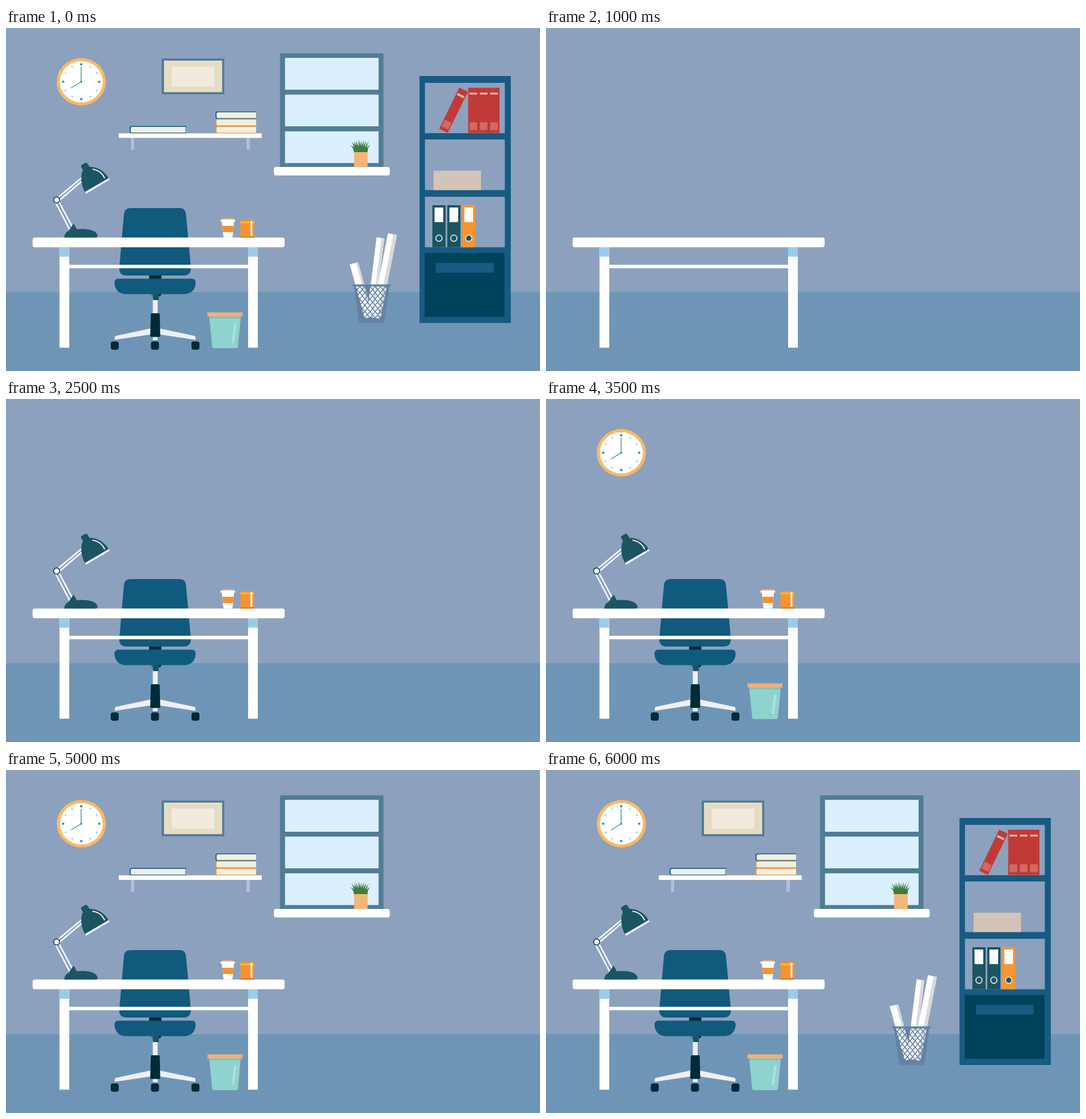
These frames come from a looping animation (933x600 px, 7 s). An HTML page:

```html
<!DOCTYPE html>
<html lang="en">
<head>
<meta charset="utf-8">
<title>Home office</title>
<style>
  html, body { margin: 0; width: 100%; height: 100%; overflow: hidden; background: #8ca1bd; }
  svg { display: block; width: 100%; height: 100%; }
</style>
</head>
<body>
<svg viewBox="0 0 933 600" xmlns="http://www.w3.org/2000/svg">
  <defs>
    <pattern id="mesh" x="609" y="452" width="9" height="11" patternUnits="userSpaceOnUse">
      <path d="M-1 -1.22L10 12.22M10 -1.22L-1 12.22" stroke="#6482a4" stroke-width="1.7"/>
    </pattern>
    <g id="binder">
      <path d="M0 0H23V73.5H0Z"/>
      <path d="M3.7 4H19V29.5H3.7Z" fill="#fff"/>
      <circle cx="11.5" cy="57.7" r="5.5" fill="#1a5560" stroke="#d3e6ea" stroke-width="1.8"/>
    </g>
    <g id="caster"><rect width="14" height="14.5" rx="4" fill="#002b37"/></g>
    <g id="volume">
      <path d="M71.5 0H4Q0 0 0 4V9Q0 13 4 13H71.5V11.5H4V1.5H71.5Z"/>
      <path d="M71 1.5H4.5Q1.8 1.5 1.8 4V9Q1.8 11.5 4.5 11.5H71Z" fill="#eff0e0"/>
    </g>
  </defs>

  <rect width="933" height="600" fill="#8ca1bd"/>
  <rect y="462" width="933" height="138" fill="#6f95b6"/>

  <!-- chair -->
  <g data-at="2500">
    <path d="M250 432H271.500V440H250Z" fill="#002b37"/>
    <path d="M218 315H303Q313.500 315 314.500 326L323 419Q323.500 433 310 433H211Q197 433 198 419L206 326Q207 315 218 315Z" fill="#105a7e"/>
    <path d="M251 464H257V469Q252 470 251 464Z" fill="#4d8587"/>
    <path d="M265 464H271V467Q270 470 265 469Z" fill="#002b37"/>
    <path d="M256.500 474H265V546H256.500Z" fill="#efeff3"/>
    <path d="M256 464H267V476H257Z" fill="#1a5561"/>
    <path d="M196 438.500H325Q331.500 438.500 331.300 446C331 456 325 465.500 311 465.500H209C196 465.500 190 456 189.500 446Q189.500 438.500 196 438.500Z" fill="#105a7e"/>
    <path d="M253 525.500L192 538.500Q190 539 190 541V545.500L253 536Z" fill="#efeff3"/>
    <path d="M268 525.500L329 538.500Q331 539 331 541V545.500L268 536Z" fill="#efeff3"/>
    <path d="M255 499H267Q268.500 499 268.600 501L269.500 538Q269.500 540.500 267 540.500H254.500Q252 540.500 252 538L253 501Q253 499 255 499Z" fill="#002b37"/>
    <use href="#caster" x="183" y="548.300"/>
    <use href="#caster" x="253.300" y="548.300"/>
    <use href="#caster" x="324" y="548.300"/>
  </g>

  <!-- desk -->
  <g data-at="1000" fill="#fff">
    <path d="M110 414.300H423V420.300H110ZM93.500 383H110.500V559.300H93.500ZM423 383H440V559.300H423Z"/>
    <path d="M93.500 383H110.500V400H93.500ZM423 383H440V400H423Z" fill="#9accea"/>
    <rect x="46.500" y="366.500" width="440.300" height="17" rx="4"/>
  </g>

  <!-- lamp -->
  <g data-at="1500">
    <path d="M86.500 305L111 352M92 303L117 350M89 298L134 260.500M92.500 302L136 265" fill="none" stroke="#fff" stroke-width="2.500"/>
    <path d="M102 366.500C102 360 105 357 110 354.500L117 343.500Q118.500 342 120 345L123.500 352C140 350 158 353 160 363Q160 366.500 157 366.500Z" fill="#1a5561"/>
    <circle cx="88.400" cy="300.800" r="5.300" fill="#fff" stroke="#1b4a66" stroke-width="1.800"/>
    <path d="M138.500 288C130 273 130 256 134.500 249L131.300 243Q130.500 240.500 133 239L138.500 236Q141 235.300 142.500 237.500L146 243C158 242.500 172 249 179.500 263.500Z" fill="#1a5561"/>
    <path d="M138 286.800L179.500 262.500L181.300 265.300L140 290Z" fill="#efeff3"/>
    <path d="M151 247C161 248.500 169 254.500 172.500 263" fill="none" stroke="#e9f0f2" stroke-width="2"/>
  </g>

  <!-- cup and notebook -->
  <g data-at="2000">
    <path d="M377 338H398.500L395.700 366.500H380Z" fill="#fff"/>
    <path d="M378 346H397.700L396.600 357H379.100Z" fill="#f5912d"/>
    <path d="M379 333H396.500Q398 333 398 336H377Q377 333 379 333Z" fill="#f3b27a"/>
    <rect x="374.700" y="335" width="25.500" height="3.700" rx="1" fill="#fff"/>
    <rect x="409.500" y="336" width="24" height="30.500" rx="1" fill="#f7922f"/>
    <path d="M409.500 338.500H433.500V341.800H409.500Z" fill="#fdb92b"/>
    <path d="M409.500 364.300H433.500V366.500H409.500Z" fill="#e27a28"/>
    <rect x="427.300" y="337.500" width="3" height="26" rx="1.200" fill="#fff"/>
  </g>

  <!-- bin -->
  <g data-at="3000">
    <path d="M355 504H410.300L405.300 557Q405 560 402 560H363.500Q360.500 560 360.200 557Z" fill="#8fd3cf"/>
    <path d="M355 504H410.300L409.900 508H355.400Z" fill="#82c3c2"/>
    <path d="M400.500 518.500L396.500 549.500" stroke="#b0e0de" stroke-width="4" stroke-linecap="round"/>
    <path d="M352 497.500H413.300V504.500H352Z" fill="#f8ad78"/>
  </g>

  <!-- clock -->
  <g data-at="3500">
    <ellipse cx="131.600" cy="94" rx="43" ry="41.500" fill="#fdb863"/>
    <ellipse cx="131.600" cy="94" rx="37.600" ry="36.200" fill="#fff"/>
    <g id="dots"></g>
    <path d="M131.300 68V94L113.500 105" fill="none" stroke="#2f93a3" stroke-width="1.400"/>
    <circle cx="131.400" cy="94" r="1.800" fill="#2f93a3"/>
  </g>

  <!-- picture -->
  <g data-at="4000">
    <path d="M272 53.500H381.300V116H272Z" fill="#4f7b95"/>
    <path d="M276 57H377.700V112.200H276Z" fill="#e6dcc2"/>
    <path d="M289.500 67.500H364V102.500H289.500Z" fill="#f0ebdd"/>
  </g>

  <!-- shelf -->
  <g data-at="4500">
    <path d="M218.500 192H224V213H218.500ZM420 192H426V213H420Z" fill="#b3c0d3"/>
    <path d="M315 171.500H220Q216 171.500 216 175.500V180.500Q216 184.500 220 184.500H315Z" fill="#15557f"/>
    <path d="M313 173H220.500Q217.800 173 217.800 175.500V180.500Q217.800 183 220.500 183H313Z" fill="#eff0e0"/>
    <path d="M313 173H315V183H313Z" fill="#8ca1bd"/>
    <use href="#volume" x="366" y="146" fill="#15557f"/>
    <use href="#volume" x="366" y="158.800" fill="#ee9640"/>
    <use href="#volume" x="366" y="171.500" fill="#ee9640"/>
    <path d="M197 184.300H446.800V192.300H197Z" fill="#fff"/>
  </g>

  <!-- window -->
  <g data-at="5000">
    <path d="M478.700 44.300H659.500V244H478.700Z" fill="#527c96"/>
    <path d="M487.500 52.300H651V108H487.500ZM487.500 116.500H651V172H487.500ZM487.500 180.700H651V236.300H487.500Z" fill="#dbf0ff"/>
    <rect x="468" y="243" width="202.500" height="15" rx="4" fill="#fff"/>
    <g id="leaves" fill="#3a7d3c"></g>
    <path d="M608.200 217H631.800V243.300H608.200Z" fill="#f4b577"/>
  </g>

  <!-- paper basket -->
  <g data-at="5500">
    <path d="M608 451H669.500L661 516H617Z" fill="#6482a4"/>
    <path d="M600.500 413.300L614 410.300L640 505L627 508Z" fill="#fff"/>
    <path d="M611.500 411L615.500 410.100L641 504.500L637 505.500Z" fill="#d9dadc"/>
    <path d="M647.500 366L661 368L644 505L630.500 503Z" fill="#fff"/>
    <path d="M656 367.300L661 368L644 505L639 504.300Z" fill="#d9dadc"/>
    <path d="M667.300 358.700L683 362L654 509L639 506Z" fill="#fff"/>
    <path d="M677 360.700L683 362L654 509L648 507.800Z" fill="#d9dadc"/>
    <path d="M609 452H668.500L661 510H617Z" fill="url(#mesh)"/>
    <path d="M609.500 452L618.500 515M668 452L659.500 515" stroke="#6482a4" stroke-width="3"/>
    <rect x="605" y="448.500" width="67.500" height="3.800" rx="1" fill="#6482a4"/>
  </g>

  <!-- bookcase -->
  <g data-at="6000">
    <path d="M722.500 84H882V516H722.500Z" fill="#175a82"/>
    <path d="M732 96H871.500V184H732ZM732 195H871.500V283.500H732ZM732 295.300H871.500V383.500H732Z" fill="#8ca1bd"/>
    <path d="M731.500 393.500H871V505.300H731.500Z" fill="#00435b"/>
    <path d="M751 411H852V428H751Z" fill="#175a82"/>
    <g transform="translate(792 104.300) rotate(26)">
      <path d="M0 0H16.700V80H0Z" fill="#c13a38"/>
      <path d="M1.700 9.500H15V13.500H1.700Z" fill="#eab2a0"/>
      <path d="M1.700 61.500H15V74.500H1.700Z" fill="#d16a60"/>
    </g>
    <g id="books"></g>
    <path d="M747 249.700H830V283.500H747Z" fill="#d4c3b8"/>
    <use href="#binder" x="745" y="310" fill="#1a5560"/>
    <use href="#binder" x="771" y="310" fill="#1a5560"/>
    <use href="#binder" x="797" y="310" fill="#f8952d"/>
  </g>
</svg>
<script>
  const LOOP = 7000, CLEAR = 500;
  const fill = (id, markup) => document.getElementById(id).innerHTML = markup.join('');

  fill('dots', Array.from({ length: 12 }, (_, i) => {
    const a = i * Math.PI / 6, big = i % 3 === 0;
    const x = 131.4 + 31.5 * Math.sin(a), y = 94 - 30.3 * Math.cos(a);
    return `<circle cx="${x}" cy="${y}" r="${big ? 2.1 : 1.3}" fill="${big ? '#2f93a3' : '#74c3cf'}"/>`;
  }));

  // Each blade: tip x, tip y, base x
  const blades = [
    [601, 205, 610], [603.5, 199, 612], [608, 198, 613.5], [611.5, 197, 615.5],
    [616, 195, 618], [620.5, 197, 620], [625, 196, 622], [629, 197, 624.5],
    [634, 198, 627], [637, 204, 629.5]
  ];
  fill('leaves', blades.map(([x, y, b]) =>
    `<path d="M${b - 2.2} 218Q${b - 2} 209 ${x} ${y}Q${b + 2} 208 ${b + 2.2} 218Z"/>`));

  fill('books', [807.5, 825.5, 843.5].map(x => `
    <path d="M${x} 104.500h18.300v79h-18.300Z" fill="#c13a38"/>
    <path d="M${x + 17.3} 104.500h1v79h-1Z" fill="#ad302f"/>
    <path d="M${x + 2.4} 113h13.400v3.500h-13.400Z" fill="#eab2a0"/>
    <path d="M${x + 2.4} 165h13.400v13.500h-13.400Z" fill="#d16a60"/>`));

  const items = [...document.querySelectorAll('[data-at]')].map(node => ({ node, at: +node.dataset.at }));

  function draw(t) {
    for (const { node, at } of items) {
      node.setAttribute('visibility', t < CLEAR || t >= at ? 'visible' : 'hidden');
    }
  }

  function tick(now) {
    draw(now % LOOP);
    requestAnimationFrame(tick);
  }

  draw(0);
  requestAnimationFrame(tick);
</script>
</body>
</html>
```
